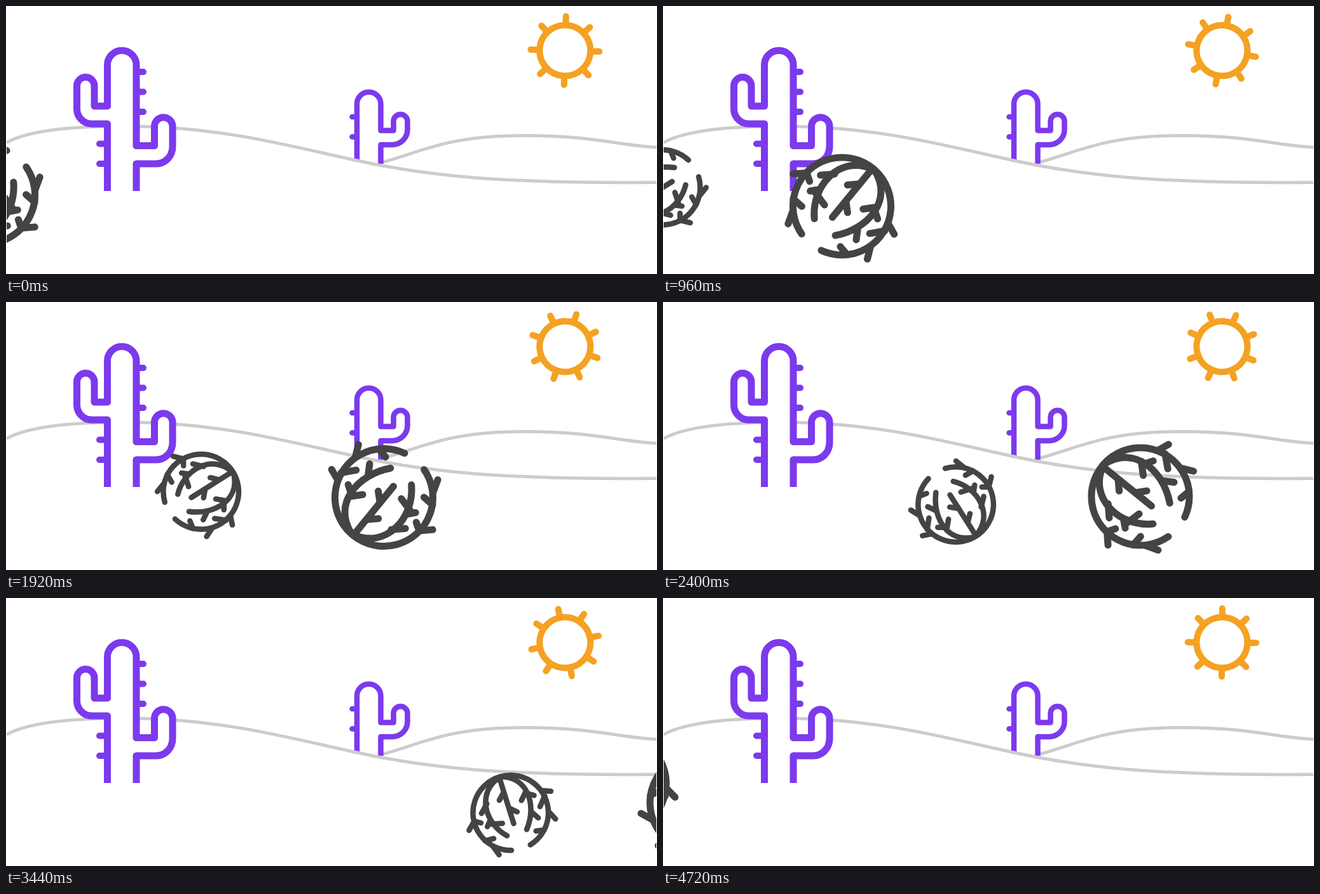
An HTML page for the animation above (4.8 s loop, 1024x423 px).

```html
<!DOCTYPE html>
<html lang="en">
<head>
<meta charset="utf-8">
<title>Desert</title>
<style>
  html, body { margin: 0; height: 100%; overflow: hidden; background: #fff; }
  svg { display: block; width: 100vw; height: 100vh; clip-path: inset(0 1px); }
  path, circle { fill: none; }
  .hill { stroke: #ccc; stroke-width: 5; }
  .cactus path { stroke: #7c3aed; stroke-linejoin: round; }
  .cactus .body { fill: #fff; }
  .cactus .spine { stroke-linecap: round; }
  .sun { stroke: #f5a122; stroke-width: 10; stroke-linecap: round; }
  .weed { stroke: #444; stroke-width: 11; stroke-linecap: round; stroke-linejoin: round; }
</style>
</head>
<body>
<svg viewBox="0 0 1024 423" preserveAspectRatio="none">
  <defs>
    <g id="weed" class="weed">
      <path d="M26 72.500A77 77 0 1 1 59 49.500"/>
      <path d="M-42-64C12-81 46-30 42 22M-44-62C-80-18-44 38 8 47M-44-60L13 19"/>
      <path d="M64-68L45-63M53-31L55-55M91-17L73-27M61 19L76 12
        M34-49L15-48L13-31M57-8L40-15M-56 20L-52-2M-36 42L-35 30M-9 26L-34 36
        M-30-17L-27-34M12-6L-6-8M-69 61L-65 40L-51 39M5 89L-12 77M-16 61L-31 71"/>
    </g>
  </defs>
  <path class="hill" d="M592 246.500C650 232 690 204.500 815 204.500C925 204.500 960 220 1023 223"/>
  <g class="cactus" stroke-width="8.500">
    <path class="spine" d="M552 175H544.500M552 206.500H544.500"/>
    <path class="body" d="M552 246V154.500A18.750 18.750 0 0 1 589.500 154.500V196.500H609.500V182
      A11 11 0 0 1 631.500 182V195A24 24 0 0 1 608 219H589.500V249"/>
  </g>
  <path class="hill" d="M1 215.500C40 194 125 189 205 190C345 192 450 222 550 243.500C660 268 780 280.500 1023 278.500"/>
  <g class="cactus" stroke-width="11">
    <path class="spine" stroke-width="10" d="M205 104H216M205 135.500H216M205 167H216M160 217.500H147M160 249H147"/>
    <path class="body" d="M159.500 292V186H134A23 24 0 0 1 111.500 161V126A13.750 13.750 0 0 1 139 126V158H159.500V93
      A22.750 22.750 0 0 1 205 93V220.500H233.500V190A14.200 14.200 0 0 1 262 190V222A26 27 0 0 1 236 249H205V292"/>
  </g>
  <g id="sun" class="sun">
    <circle r="40"/>
    <path d="M0-42V-54M0 42V54M-42 0H-54M42 0H54M30-30L38-38M-30-30L-38-38M30 30L38 38M-30 30L-38 38"/>
  </g>
  <use id="small" href="#weed"/>
  <use id="big" href="#weed"/>
</svg>
<script>
const LOOP = 4800, STEP = 80, LAP = 4844, SPIN = 0.1875;
const [sun, small, big] = ['sun', 'small', 'big'].map(id => document.getElementById(id));

// heights along the way: [ms, y]
const bigRoad = [[-300, 289], [-124, 293], [0, 298], [560, 310], [1080, 317], [1280, 315],
  [1920, 308.5], [2400, 307], [2800, 310], [3440, 323], [4000, 325]];
const smallRoad = [[700, 285], [1280, 288.5], [1920, 299.5], [2800, 335], [3440, 339], [4100, 333], [4800, 325]];

// smooth cubic through the points
function height(road, t) {
  const last = road.length - 1;
  if (t <= road[0][0]) return road[0][1];
  if (t >= road[last][0]) return road[last][1];
  const i = road.findIndex(p => p[0] > t) - 1;
  const slope = k => {
    const a = road[Math.max(k - 1, 0)], b = road[Math.min(k + 1, last)];
    return (b[1] - a[1]) / (b[0] - a[0]);
  };
  const [t0, y0] = road[i], [t1, y1] = road[i + 1];
  const d = t1 - t0, u = (t - t0) / d, v = 1 - u;
  return v * v * ((1 + 2 * u) * y0 + u * d * slope(i)) +
    u * u * ((3 - 2 * u) * y1 - v * d * slope(i + 1));
}

function place(el, x, y, angle, scale = 1) {
  el.setAttribute('transform', `translate(${x} ${y}) rotate(${angle}) scale(${scale})`);
}

function draw(now) {
  const t = Math.floor(now % LOOP / STEP) * STEP;
  const s = t > 4000 ? t - LAP : t; // the big one re-enters before the loop ends
  place(sun, 879.3, 70.3, 1.6 + 0.0093 * t);
  place(big, -31.5 + 0.326 * s, height(bigRoad, s), SPIN * (t - 560));
  place(small, 101.7 + 0.3204 * (t - 1280), height(smallRoad, t), SPIN * (t - 1280) - 26.5, 0.77);
}

let start;
function tick(now) {
  start ??= now;
  draw(now - start);
  requestAnimationFrame(tick);
}
draw(0);
requestAnimationFrame(tick);
</script>
</body>
</html>
```
